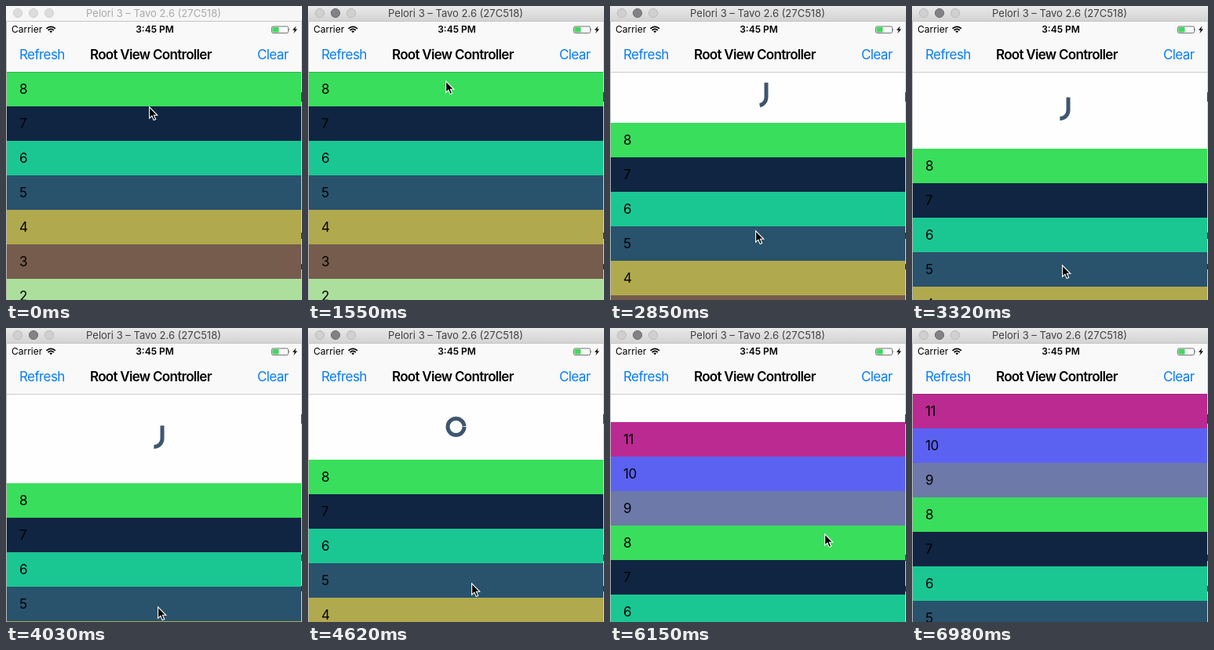
These frames come from a looping animation (377 by 375 pixels, 7.31 s). An HTML page:

```html
<!DOCTYPE html>
<html lang="en">
<head>
<meta charset="utf-8">
<title>Pull to refresh</title>
<style>
  html, body { margin: 0; width: 100%; height: 100%; overflow: hidden; background: #fff; }
  svg { display: block; width: 377px; height: 375px; }
  text { font-family: Inter, Roboto, "Liberation Sans", sans-serif; white-space: pre; }
  .status { font-size: 12px; }
  .nav { font-size: 17px; letter-spacing: -.6px; fill: #0a7cf5; }
  .heading { font-size: 17px; font-weight: 600; letter-spacing: -.7px; }
  .row { font-size: 17px; letter-spacing: -.4px; }
  .caption { font-size: 13px; fill: #a9a9a9; }
  .light { fill: #dcdcdc; stroke: #d0d0d0; }
  .active .caption { fill: #404040; }
  .active .light { fill: #d0d0d0; stroke: #bcbcbc; }
  .active .minimize { fill: #828286; stroke: #707074; }
</style>
</head>
<body>
<svg viewBox="0 0 377 375">
  <defs>
    <linearGradient id="chrome" x2="0" y2="1">
      <stop stop-color="#e9e9e9"/><stop offset="1" stop-color="#d3d3d3"/>
    </linearGradient>
  </defs>
  <rect width="377" height="375" fill="#fefefe"/>
  <g id="spinner" fill="none" stroke="#3e566e" stroke-width="5">
    <path id="curve" d="M10.5-66V0A10.5 10.5 0 0 1-10.5 0A10.5 10.5 0 0 1 10.5 0"/>
  </g>
  <g id="rows"></g>

  <rect y="20" width="377" height="64" fill="#f9f9f9"/>
  <rect y="84" width="377" height="1" fill="#000" opacity=".2"/>
  <text class="status" x="7" y="34">Carrier</text>
  <g fill="none" stroke="#000" stroke-width="1.7">
    <path d="M51.5 28.8Q57.2 23.8 62.9 28.8M53.6 31Q57.2 27.8 60.8 31"/>
    <path d="M55.3 32.3Q57.2 30.8 59.1 32.3L57.2 34.3Z" fill="#000" stroke="none"/>
  </g>
  <text class="status" x="189.5" y="34" text-anchor="middle" font-weight="600">3:45 PM</text>
  <rect x="338.5" y="26" width="21" height="8.5" rx="1.8" fill="none" stroke="#555" stroke-width=".8"/>
  <rect x="339.5" y="27" width="8" height="6.5" rx=".8" fill="#43d860"/>
  <path d="M360.5 28.7q1.6 1.5 0 3z" fill="#555"/>
  <path d="M369.5 25.5L365 30.8H367.7L366.3 35L371 29.4H368.2Z"/>
  <text class="nav" x="17" y="68">Refresh</text>
  <text class="heading" x="107" y="68">Root View Controller</text>
  <text class="nav" x="320" y="68">Clear</text>

  <g id="titlebar">
    <rect id="bar" width="377" height="19"/>
    <rect y="19" width="377" height="1" fill="#c4c4c4"/>
    <circle class="light" cx="15" cy="9" r="5.6"/>
    <circle class="light minimize" cx="35" cy="9" r="5.6"/>
    <circle class="light" cx="55" cy="9" r="5.6"/>
    <text class="caption" x="188" y="14" text-anchor="middle">Pelori 3 – Tavo 2.6 (27C518)</text>
  </g>
  <rect y="20" width="1" height="355" fill="#b9b9b9"/>
  <rect x="376" y="20" width="1" height="355" fill="#d2d2d2"/>
  <path d="M376 110h1v12h-1zM376 289h1v8h-1zM376 329h1v7h-1z" fill="#333"/>
  <path id="cursor" d="M.6.8V15.2L3.9 12.2L6.2 17.6L8.7 16.5L6.4 11.3H10.8Z" stroke="#fff" stroke-width="1.1"/>
</svg>
<script>
const LOOP = 7310, TICK = 118.4;
const ACTIVATE = 13, RELEASE = 36, SPIN = 40, RELOAD = 50, LEAVE = 59;
const ROW = 44, LIST_TOP = 84, REST = 70;
const ARC = Math.PI * 10.5, RING = 2 * ARC, LEAD = 66;

const colors = { 11: '#bb2a91', 10: '#5b62f1', 9: '#6d79a8', 8: '#39de5c', 7: '#102542',
  6: '#1ac792', 5: '#29526c', 4: '#b1a94d', 3: '#755c4d', 2: '#acdf9c' };

// Keys are [tick, value, ...].
const pullKeys = [[13, 0], [15, 1], [17, 6], [19, 17], [21, 33], [24, 65], [28, 98], [31, 109],
  [34, 114], [36, 114], [37, 107], [38, 95], [39, 84], [40, 77], [42, 71], [43, 70],
  [50, 70], [51, 56], [52, 36], [53, 19], [54, 8], [56, 1], [57, 0]];
const cursorKeys = [[0, 182, 128], [3, 177, 106], [5, 175, 92], [7, 175, 92], [10, 175, 95],
  [14, 175, 95], [15, 175, 102], [17, 175, 125], [19, 175, 155], [21, 177, 198], [24, 185, 286],
  [28, 191, 330], [34, 193, 355], [36, 193, 355], [38, 200, 340], [41, 225, 295], [45, 254, 261],
  [52, 273, 262], [54, 285, 275], [57, 326, 323], [58, 347, 351]];

const $ = id => document.getElementById(id);
const clamp = x => Math.max(0, Math.min(1, x));
const mix = (a, b, p) => a + (b - a) * p;

function sample(keys, tick) {
  const next = keys.findIndex(key => key[0] > tick);
  if (next < 0) return keys[keys.length - 1].slice(1);
  if (next === 0) return keys[0].slice(1);
  const a = keys[next - 1], b = keys[next];
  const p = (tick - a[0]) / (b[0] - a[0]);
  return a.slice(1).map((v, i) => mix(v, b[i + 1], p));
}

$('rows').innerHTML = Object.keys(colors).sort((a, b) => b - a).map((n, i) =>
  `<g transform="translate(0 ${i * ROW})"><rect width="377" height="${ROW}" fill="${colors[n]}"/>` +
  `<text class="row" x="17" y="28">${n}</text></g>`).join('');
const rows = [...$('rows').children];

function drawSpinner(tick, pull) {
  $('spinner').style.display = tick >= ACTIVATE && tick < RELOAD ? '' : 'none';
  const closing = clamp((tick - RELEASE) / 3);
  const reach = (Math.min(1, pull / REST) - .5) * ARC;
  const head = mix(reach, RING - 1.2, closing);
  const tail = mix(reach - ARC, 0, closing);
  const turn = Math.max(0, tick - SPIN) * 54;
  $('curve').setAttribute('stroke-dasharray', `0 ${LEAD + tail} ${head - tail} 999`);
  $('spinner').setAttribute('transform', `translate(188.5 ${LIST_TOP + pull / 2}) rotate(${turn})`);
}

function draw(now) {
  const tick = Math.floor((now % LOOP + 10) / TICK);
  const pull = Math.round(sample(pullKeys, tick)[0]);
  const [x, y] = sample(cursorKeys, tick).map(Math.round);
  const active = tick >= ACTIVATE, hiddenRows = tick < RELOAD ? 3 : 0;

  $('titlebar').classList.toggle('active', active);
  $('bar').setAttribute('fill', active ? 'url(#chrome)' : '#f6f6f6');
  rows.forEach((row, i) => row.style.display = i < hiddenRows ? 'none' : '');
  $('rows').setAttribute('transform', `translate(0 ${LIST_TOP + pull - hiddenRows * ROW})`);
  drawSpinner(tick, pull);
  $('cursor').style.display = tick < LEAVE ? '' : 'none';
  $('cursor').setAttribute('transform', `translate(${x} ${y})`);
}

const start = performance.now();
function frame() {
  draw(performance.now() - start);
  requestAnimationFrame(frame);
}
frame();
</script>
</body>
</html>
```
